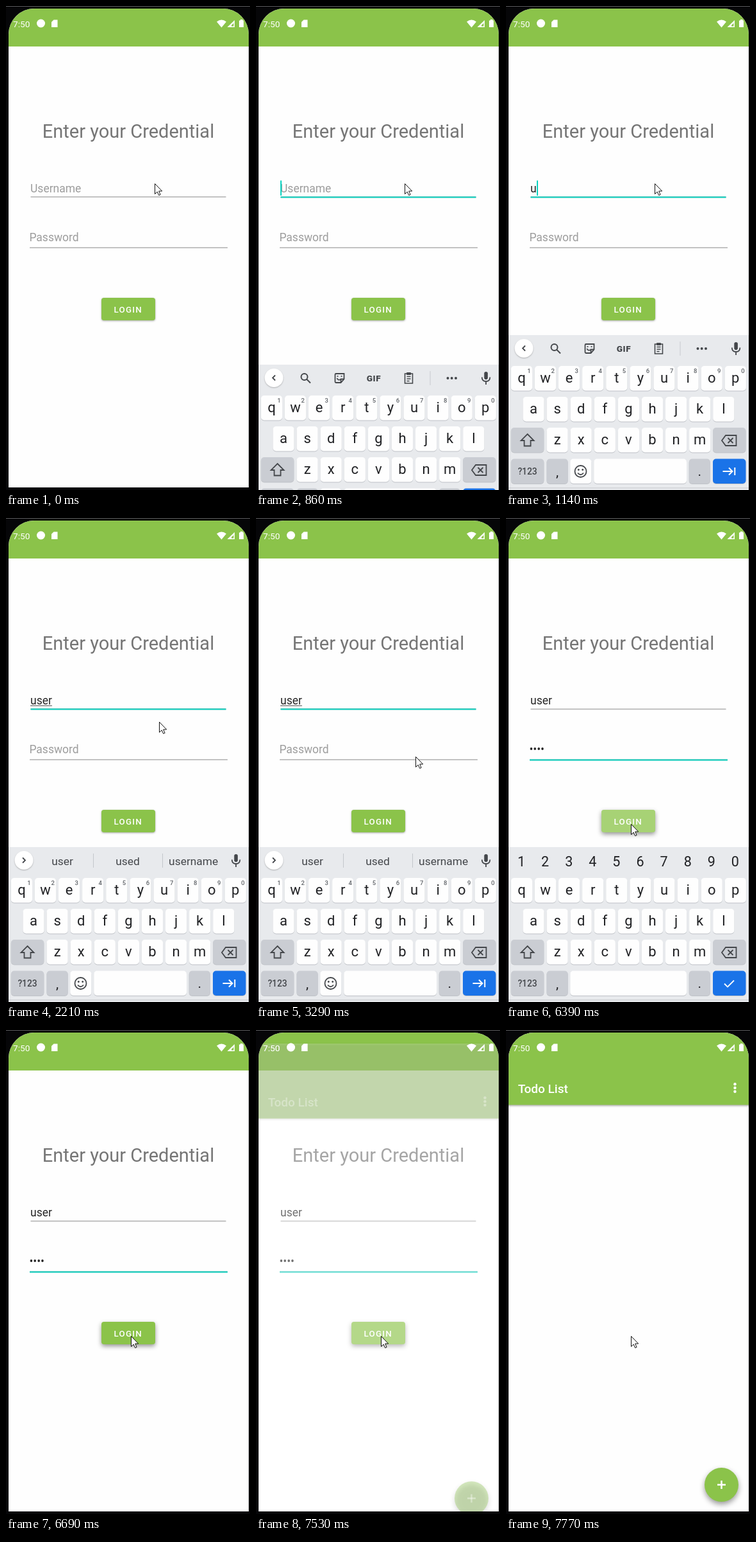
An HTML page with a canvas for the animation above (8 s loop, 381x753 px).

```html
<!DOCTYPE html>
<html lang="en">
<head>
<meta charset="utf-8">
<title>Login</title>
<style>
  html, body { margin: 0; width: 381px; height: 753px; overflow: hidden; background: #060608; }
  canvas { display: block; }
</style>
</head>
<body>
<canvas id="stage" width="381" height="753"></canvas>
<script>
const ctx = document.getElementById('stage').getContext('2d');
const LOOP = 8000, GREEN = '#8bc34a', TEAL = '#0bd3c1', INK = '#202124', GREY = '#44474b';

// Each step changes part of the state from its time on.
const steps = [
  [0, { mouse: [232, 276], user: '', pass: '', focus: '', glow: 1, caret: 0, composing: 0, used: 0,
        board: '', drop: 0, tips: '', press: 0, lift: 0, todo: 0 }],
  [280, { focus: 'user', glow: .5, caret: 1, used: 1 }],
  [400, { glow: 1 }],
  [860, { board: 'icons', drop: 46 }],
  [1140, { drop: 0, user: 'u' }],
  [1260, { board: 'words', user: 'us', composing: 1, tips: 'us use is' }],
  [1540, { user: 'use', tips: 'use used uses' }],
  [1840, { user: 'user', tips: 'user used username' }],
  [2210, { caret: 0, mouse: [239, 317] }],
  [2360, { mouse: [247, 358] }],
  [2480, { mouse: [249, 371] }],
  [2730, { caret: 1 }],
  [3290, { caret: 0 }],
  [3410, { mouse: [205, 361] }],
  [3530, { mouse: [174, 357] }],
  [3810, { caret: 1 }],
  [3940, { focus: 'pass', composing: 0, board: 'digits' }],
  [4370, { pass: '•s' }],
  [4670, { pass: '••e' }],
  [4820, { pass: '•••r' }],
  [5330, { caret: 0, mouse: [174, 372] }],
  [5450, { mouse: [174, 388] }],
  [5600, { mouse: [181, 422] }],
  [5720, { mouse: [191, 466] }],
  [5870, { caret: 1, mouse: [195, 476] }],
  [6270, { press: .5, lift: 1 }],
  [6390, { press: 1, caret: 0, pass: '••••' }],
  [6540, { press: .4, drop: 90 }],
  [6690, { press: 0, board: '' }],
  [7530, { todo: .35 }],
  [7650, { todo: .85 }],
  [7770, { todo: 1 }]
];

function stateAt(t) {
  return Object.assign({}, ...steps.filter(s => s[0] <= t).map(s => s[1]));
}

function text(str, x, y, size, color, align = 'left', weight = 400, spacing = 0) {
  ctx.font = `${weight} ${size}px Roboto, sans-serif`;
  ctx.letterSpacing = spacing + 'px';
  ctx.textAlign = align;
  ctx.fillStyle = color;
  ctx.fillText(str, x, y);
}

function rect(x, y, w, h, color, r = 0) {
  ctx.fillStyle = color;
  ctx.beginPath();
  ctx.roundRect(x, y, w, h, r);
  ctx.fill();
}

function disc(x, y, r, color) {
  ctx.fillStyle = color;
  ctx.beginPath();
  ctx.arc(x, y, r, 0, 7);
  ctx.fill();
}

function fill(d, color) {
  ctx.fillStyle = color;
  ctx.fill(new Path2D(d));
}

function stroke(d, color, width = 1.8) {
  ctx.strokeStyle = color;
  ctx.lineWidth = width;
  ctx.stroke(new Path2D(d));
}

function shadowed(blur, dy, alpha, draw) {
  ctx.save();
  ctx.shadowColor = `rgba(0,0,0,${alpha})`;
  ctx.shadowBlur = blur;
  ctx.shadowOffsetY = dy;
  draw();
  ctx.restore();
}

function statusBar() {
  text('7:50', 11, 32.5, 13.7, '#fff');
  disc(54.5, 27, 6.5, '#fff');
  fill('M74.5 21.5H80.5V33H71V25Z', '#fff');
  fill('M329 24.5Q336.5 18.5 344 24.5L336.5 33.5Z', '#fff');
  fill('M357 22V33H345.5Z', '#fff');
  fill('M355.5 26.5V31.5H352V30Z', GREEN);
  fill('M364 22.5H366V21H369.5V22.5H371V33H364Z', '#fff');
}

function line(x, y, w, active, s) {
  const full = s.used && !active;
  rect(x, y, w, active || full ? 1.8 : 1.2, full ? '#b8b8b8' : '#8a8a8a');
  if (active) {
    ctx.globalAlpha = s.glow;
    rect(x, y, w, 2.2, TEAL);
    ctx.globalAlpha = 1;
  }
}

function field(name, hint, x, base, s) {
  const value = s[name];
  text(value || hint, x, base, 17.5, value ? '#262626' : '#9d9d9d');
  const width = value ? ctx.measureText(value).width : 0;
  if (name === 'user' && s.composing) rect(x, base + 1.5, width, 1, '#444');
  if (s.focus === name && s.caret) rect(Math.round(x + width), base - 18.5, 2, 23.5, TEAL);
}

function login(s) {
  rect(0, 0, 381, 753, '#fefefe');
  rect(0, 0, 381, 63, GREEN);
  statusBar();
  text('Enter your Credential', 191, 204.5, 29, '#757575', 'center');
  line(38.5, 296.4, 305, s.focus === 'user', s);
  if (s.focus === 'pass') line(37, 375.4, 309, true, s);
  else line(37, 375.4, 309, false, { used: 0 });
  field('user', 'Username', 38, 290, s);
  field('pass', 'Password', 36.4, 366, s);

  shadowed(s.lift ? 7 : 3, s.lift ? 3 : 1, s.lift ? .42 : .35, () => rect(149, 454, 84, 35, GREEN, 4));
  rect(149, 454, 84, 35, `rgba(255,255,255,${.24 * s.press})`, 4);
  text('LOGIN', 168.6, 477, 13.3, '#fff', 'left', 500, 1.2);
}

function key(x, y, w, color = '#fefefe') {
  rect(x, y + 1, w, 38.5, '#bfc2c7', 5);
  rect(x, y, w, 38.5, color, 5);
}

function letters(row, x, y) {
  [...row].forEach((c, i) => {
    key(x + i * 37.1, y, 33.2);
    text(c, x + 16.6 + i * 37.1, y + 26, 22, INK, 'center');
  });
}

function mic() {
  rect(356.3, 523, 5.6, 12, GREY, 2.8);
  stroke('M352.8 531.5Q353 538 359.1 538T365.4 531.5M359.1 538V543', GREY);
}

function expander(d) {
  shadowed(2, 1, .25, () => disc(28, 532.5, 14.5, '#fff'));
  stroke(d, GREY);
}

function iconRow() {
  expander('M30 528.5L26 532.5L30 536.5');
  stroke('M80.5 531A5 5 0 1 1 70.5 531A5 5 0 1 1 80.5 531M79 534.5L85 540.5', GREY, 2);
  stroke('M125 526H137.5V534.5L132.5 540H125Q123.5 540 123.5 538.5V527.5Q123.5 526 125 526M137.5 534.5H132.5V540M126.5 533Q128 537 132 535', GREY);
  disc(127.5, 530, 1.1, GREY);
  disc(133.5, 530, 1.1, GREY);
  text('GIF', 184, 537.5, 13.5, GREY, 'center', 900, .6);
  stroke('M232.5 526H244.5V541H232.5ZM235.5 530.5H241.5M235.5 534H241.5M235.5 537.5H239.5', GREY, 1.6);
  rect(235, 524, 7, 4, GREY, 1);
  rect(271.5, 522, 1, 22, '#c8cacf');
  [299.5, 305.7, 312].forEach(x => disc(x, 533, 2, GREY));
  mic();
}

function wordRow(tips) {
  expander('M26 528.5L30 532.5L26 536.5');
  tips.split(' ').forEach((w, i) => text(w, [88, 190, 292.7][i], 540, 17.4, GREY, 'center'));
  rect(136, 522, 1, 22, '#c4c7cc');
  rect(244, 522, 1, 22, '#c4c7cc');
  mic();
}

function keyboard(s) {
  const digits = s.board === 'digits', dark = '#cacdd3';
  ctx.save();
  ctx.translate(0, s.drop);
  rect(0, 512, 381, 241, '#e8eaed');
  rect(0, 749, 381, 1.5, '#d2d4d8');
  if (s.board === 'icons') iconRow();
  if (s.board === 'words') wordRow(s.tips);

  letters('qwertyuiop', 7.8, 560);
  letters('asdfghjkl', 26.4, 608);
  letters('zxcvbnm', 63.5, 656);
  [...'1234567890'].forEach((d, i) => digits
    ? text(d, 24 + i * 37.1, 541.5, 21.5, INK, 'center')
    : text(d, 36 + i * 37.1, 570.5, 9.5, '#5f6368', 'center', 500));

  key(7.8, 656, 51.5, dark);
  stroke('M33.5 666L43.5 676H38.5V684.5H28.5V676H23.5Z', GREY);
  key(323, 656, 51.5, dark);
  stroke('M343 668H359.5V684H343L337 676ZM346.5 672L354.5 680M354.5 672L346.5 680', GREY);

  key(7.8, 704.5, 51.5, dark);
  text('?123', 33.5, 729, 13.8, GREY, 'center', 500);
  key(63.5, 704.5, 33.2, dark);
  text(',', 80, 732, 21, INK, 'center');
  if (!digits) {
    key(100.2, 704.5, 33.2);
    stroke('M125.5 724A9 9 0 1 1 107.5 724A9 9 0 1 1 125.5 724M112 726.5Q116.5 732 121 726.5', GREY);
    disc(113.3, 721.5, 1.4, GREY);
    disc(119.7, 721.5, 1.4, GREY);
  }
  const left = digits ? 100.2 : 137.2;
  key(left, 704.5, 282 - left);
  key(285.7, 704.5, 33.2, dark);
  text('.', 302.3, 731, 21, INK, 'center');
  key(323, 704.5, 51.5, '#1a73e8');
  if (digits) stroke('M341 724.5L346 729.5L356 719.5', '#fff');
  else stroke('M338.5 724H353M348 718.5L353.5 724L348 729.5M357.3 718V730', '#fff', 2);
  ctx.restore();
}

function todo(amount) {
  ctx.save();
  ctx.globalAlpha = amount;
  ctx.translate(0, 50 * (1 - amount) ** 2);
  rect(0, 0, 381, 753, '#fefefe');
  shadowed(3, 1, .35, () => rect(0, 0, 381, 116.5, GREEN));
  text('Todo List', 18.8, 97.5, 19, '#fff', 'left', 500);
  [84.3, 90, 95.7].forEach(y => disc(357.5, y, 2.2, '#fff'));
  shadowed(8, 4, .4, () => disc(336.5, 707.5, 26.5, GREEN));
  rect(330, 706.2, 13, 2.6, '#fff');
  rect(335.2, 701, 2.6, 13, '#fff');
  ctx.restore();
  statusBar();
}

function pointer([x, y]) {
  ctx.save();
  ctx.translate(x + .5, y + .5);
  const arrow = 'M0 0V16L3.7 12.6L6.2 18L8.6 17L6.2 11.5H11.2Z';
  fill(arrow, '#fff');
  stroke(arrow, '#111', 1);
  ctx.restore();
}

function frame() {
  const s = stateAt(performance.now() % LOOP);
  rect(0, 0, 381, 753, '#060608');
  rect(0, 0, 381, 1, '#5a5a5c');
  ctx.save();
  ctx.beginPath();
  ctx.roundRect(4, 4, 375, s.board ? 749 : 745, [40, 40, 0, 0]);
  ctx.clip();
  login(s);
  if (s.board) keyboard(s);
  if (s.todo) todo(s.todo);
  ctx.restore();
  pointer(s.mouse);
  requestAnimationFrame(frame);
}
frame();
</script>
</body>
</html>
```
